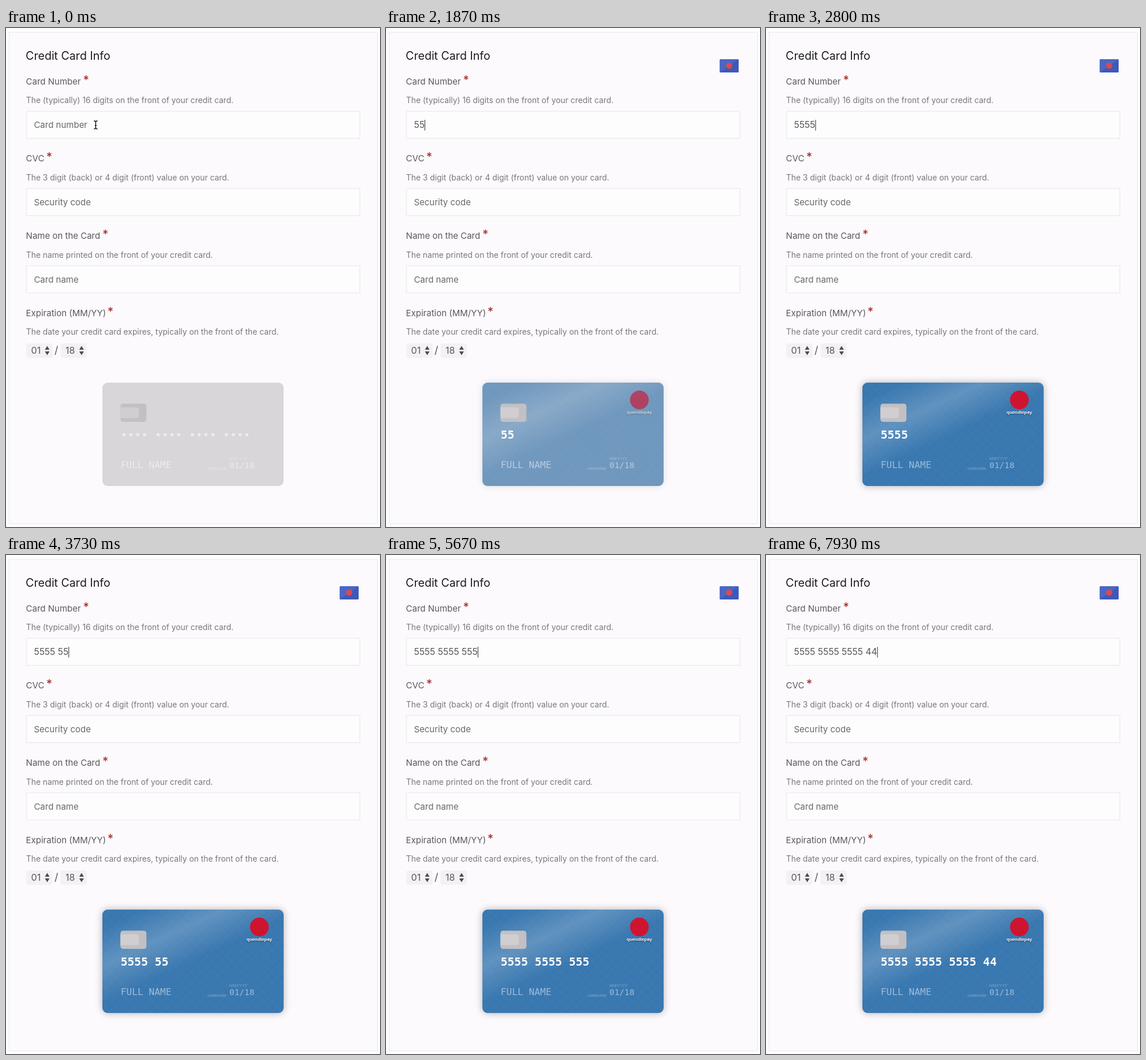
Recreate the animation shown at these times as an HTML page. Size 648 by 864 pixels, loop 8000 ms.

```html
<!DOCTYPE html>
<html lang="en">
<head>
<meta charset="utf-8">
<title>Credit card form</title>
<style>
  html, body { margin: 0; width: 100%; height: 100%; overflow: hidden; background: #fdfcfe; }
  #stage { position: absolute; left: 0; top: 0; width: 648px; height: 864px; overflow: hidden; }
  #panel { position: absolute; left: 5px; top: 7px; width: 637px; height: 850px;
    background: #fcfafd; border: 1px solid #ebe9ee; }
  #card { position: absolute; left: 167px; top: 613.7px; width: 314px; height: 179.4px;
    border-radius: 9px; background: #d8d6d9; }
  #tint { position: absolute; inset: 0; border-radius: 9px; opacity: 0;
    --weave: transparent 1px, rgba(255,255,255,.03) 2px, rgba(255,255,255,.04) 3px, rgba(255,255,255,.05) 4px;
    background:
      linear-gradient(-25deg, rgba(255,255,255,0) 50%, rgba(255,255,255,.2) 70%, rgba(255,255,255,0) 90%),
      repeating-linear-gradient(45deg, var(--weave)),
      repeating-linear-gradient(135deg, var(--weave)),
      repeating-linear-gradient(90deg, var(--weave)),
      repeating-linear-gradient(210deg, var(--weave)),
      #1f66a6; }
  svg { position: absolute; left: 0; top: 0; }
  text { font-family: Inter, "Noto Sans", sans-serif; font-size: 15px; fill: #5a595c; white-space: pre; }
  .title { font-size: 19.6px; fill: #1c1b1e; }
  .hint { font-size: 13.82px; fill: #79777b; }
  .star { font-size: 20px; font-weight: 500; fill: #a5302f; }
  .field { fill: #fefdfe; stroke: #eeecf0; stroke-width: 1.5; }
  .entry { fill: #68666a; }
  .typed { font-size: 15.58px; fill: #565558; }
  .pick { font-size: 16px; }
  .mono { font-family: "DejaVu Sans Mono", "Liberation Mono", monospace; fill: #fff; }
  .tiny { font-family: "Liberation Sans", Arial, sans-serif; font-size: 6.8px; fill: #fff; fill-opacity: .33; }
  .brand { font-family: "Liberation Sans", Arial, sans-serif; font-size: 7.9px; font-weight: 700;
    fill: #fff; text-shadow: 0 1px 2px rgba(0,0,0,.6); }
</style>
</head>
<body>
<div id="stage">
  <div id="panel"></div>
  <div id="card"><div id="tint"></div></div>
  <svg id="view" width="648" height="864" viewBox="0 0 648 864"></svg>
</div>
<script>
const LOOP = 8000, FOCUS = 200, FADE = 400;
const DIGITS = '55555555555544';
const KEYS = [1430, 1610, 2200, 2730, 3200, 3700, 4150, 4530, 4950, 5300, 5630, 6200, 6800, 7450];
const DOTS = '•••• •••• •••• ••••';

const view = document.getElementById('view');
const tint = document.getElementById('tint');

function add(tag, attrs, parent = view) {
  const el = document.createElementNS('http://www.w3.org/2000/svg', tag);
  for (const k in attrs) el.setAttribute(k, attrs[k]);
  parent.appendChild(el);
  return el;
}

function label(str, x, y, cls, attrs = {}, parent = view) {
  const el = add('text', { x, y, class: cls, ...attrs }, parent);
  el.textContent = str;
  return el;
}

function row(i, name, starX, hint, placeholder) {
  const y = i * 133.7;
  label(name, 34.6, y + 97.6, 'name');
  label('*', starX, y + 96.7, 'star', { 'text-anchor': 'middle' });
  label(hint, 34.8, y + 130.2, 'hint');
  if (!placeholder) return null;
  add('rect', { x: 35.5, y: y + 144.3, width: 577.5, height: 46.8, class: 'field' });
  return label(placeholder, 48.4, y + 173.2, 'entry');
}

function picker(x, value) {
  add('rect', { x, y: 546, width: 45.5, height: 25, rx: 4, fill: '#f3f1f4' });
  label(value, x + 8.6, 564, 'pick');
  const c = x + 36.4;
  add('path', {
    d: `M${c - 4} 557L${c} 550.5L${c + 4} 557ZM${c - 4} 560L${c} 566.5L${c + 4} 560Z`,
    fill: '#4c4b4e'
  });
}

// Form
label('Credit Card Info', 34.1, 55.2, 'title');
const input = row(0, 'Card Number', 138.6, 'The (typically) 16 digits on the front of your credit card.', 'Card number');
row(1, 'CVC', 75, 'The 3 digit (back) or 4 digit (front) value on your card.', 'Security code');
row(2, 'Name on the Card', 172.3, 'The name printed on the front of your credit card.', 'Card name');
row(3, 'Expiration (MM/YY)', 181, 'The date your credit card expires, typically on the front of the card.');
picker(35, '01');
label('/', 87.3, 564.3, 'pick', { 'text-anchor': 'middle', style: 'font-size:18px' });
picker(94.5, '18');

const caret = add('rect', { y: 159, width: 1.2, height: 18.5, fill: '#4a494c' });
const pointer = add('path', {
  d: 'M152.3 160.7Q155.4 160.7 155.4 163V172.5Q155.4 174.8 152.3 174.8M158.5 160.7Q155.4 160.7 155.4 163M158.5 174.8Q155.4 174.8 155.4 172.5M153.8 168.6H157',
  fill: 'none', stroke: '#111', 'stroke-width': 1.4
});

const badge = add('g', {});
add('rect', { x: 578.3, y: 54, width: 32.7, height: 23, rx: 1.5, fill: '#3f59b9' }, badge);
add('path', { d: 'M579.8 54H611L578.3 77V55.5Q578.3 54 579.8 54Z', fill: '#4b67c4' }, badge);
add('circle', { cx: 594.6, cy: 65.3, r: 5.3, fill: '#e2474b' }, badge);

// Card face
add('rect', { x: 198.3, y: 650.5, width: 45, height: 31.5, rx: 4.5, fill: '#c2c0c3' });
add('path', { d: 'M198.3 656.8H225.8Q230 656.8 230 661.2V671.2Q230 675.6 225.8 675.6H198.3Z', fill: '#d0ced1' });
const number = label('', 198.7, 710.7, 'mono', { style: 'font-size:19.65px' });
label('FULL NAME', 198.7, 762.2, 'mono', { style: 'font-size:16.2px', 'fill-opacity': .5 });
label('validtodate', 349, 765.4, 'tiny');
label('MM/YYYY', 387, 748.4, 'tiny');
label('01/18', 387, 762.4, 'mono', { style: 'font-size:14.4px', 'fill-opacity': .5 });

const logo = add('g', {});
add('circle', { cx: 439, cy: 644, r: 16.2, fill: '#cf1430' }, logo);
label('quendlepay', 439, 668.2, 'brand', { 'text-anchor': 'middle' }, logo);

const ramp = (t, start, span) => Math.min(1, Math.max(0, (t - start) / span));
const show = (el, on) => el.setAttribute('visibility', on ? 'visible' : 'hidden');

function draw(t) {
  const count = KEYS.filter(k => t >= k).length;
  const typed = DIGITS.slice(0, count).replace(/(.{4})(?=.)/g, '$1 ');
  const focused = t >= FOCUS;

  input.textContent = typed || 'Card number';
  input.setAttribute('class', typed ? 'typed' : 'entry');
  caret.setAttribute('x', 48.3 + (typed ? input.getComputedTextLength() : 0));
  show(caret, focused && !(t >= 800 && t < 1000));
  show(pointer, !typed);
  show(badge, count >= 2);

  number.textContent = typed || DOTS;
  number.style.fontWeight = focused ? 700 : 400;
  number.style.fillOpacity = .5 + .5 * ramp(t, FOCUS - 60, 200);

  // The card takes its colour once the second digit settles the issuer.
  const p = ramp(t, KEYS[1], FADE);
  tint.style.opacity = p;
  tint.style.boxShadow = `0 0 13px rgba(0,0,0,${.3 * p})`;
  logo.setAttribute('opacity', p);
}

const begin = performance.now();
function tick() {
  draw((performance.now() - begin) % LOOP);
  requestAnimationFrame(tick);
}
tick();
</script>
</body>
</html>
```
